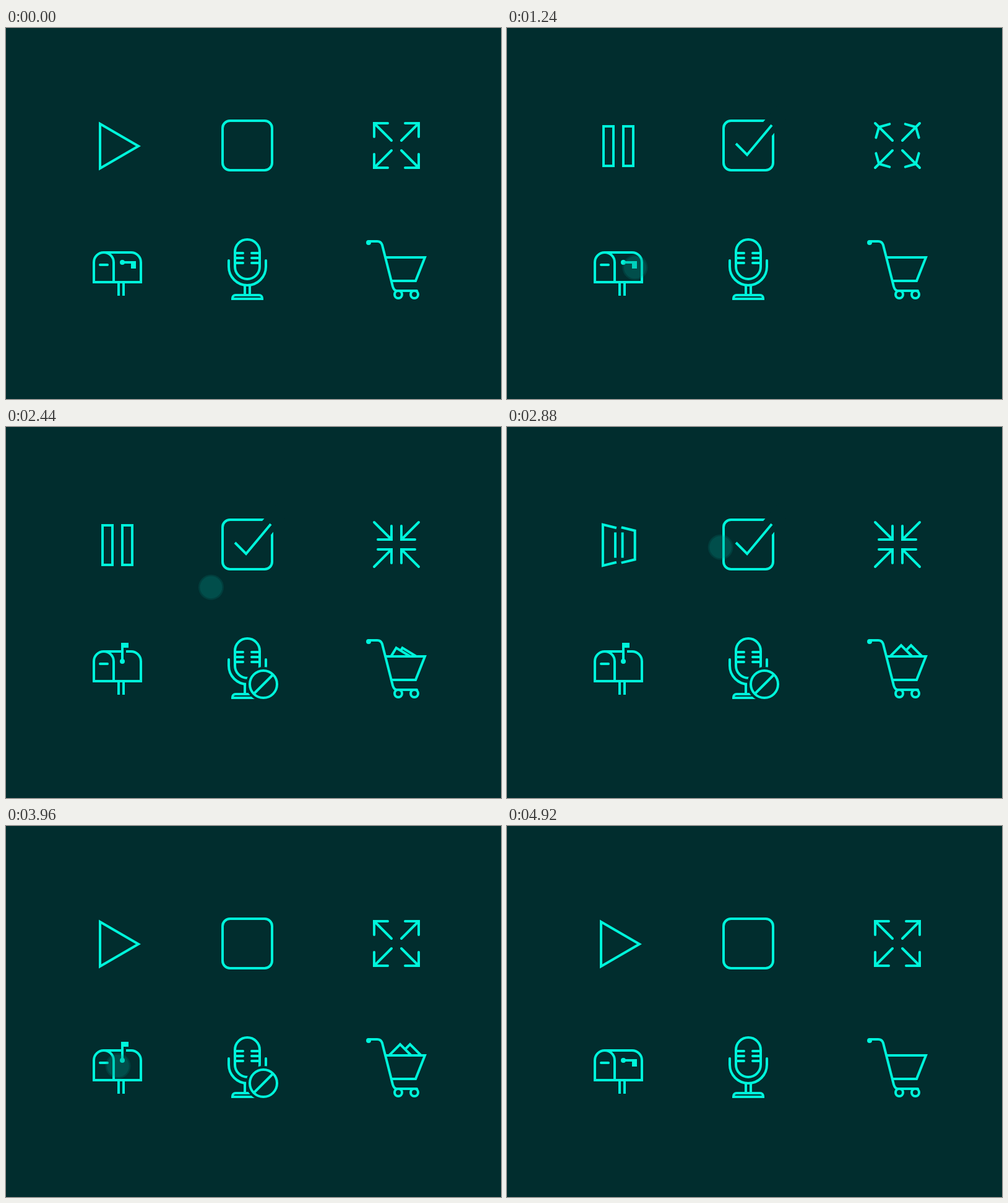
Animation, 800 px wide and 600 px high, one loop 5.2 s. Source, as an HTML page with a canvas:

```html
<!DOCTYPE html>
<html lang="en">
<head>
<meta charset="utf-8">
<title>Icon states</title>
<style>
html, body { margin: 0; width: 100%; height: 100%; overflow: hidden; background: #012d2e; }
canvas { display: block; }
</style>
</head>
<body>
<canvas id="stage" width="800" height="600"></canvas>
<script>
const ctx = document.getElementById('stage').getContext('2d');
const LOOP = 5200, STEP = 40;
const BG = '#012d2e', INK = '#00f5db';

const clamp = v => Math.max(0, Math.min(1, v));
const lerp = (a, b, p) => a + (b - a) * p;
const quad = u => u < 0.5 ? 2 * u * u : 1 - 2 * (1 - u) ** 2;
const quadOut = u => 1 - (1 - u) ** 2;
const cubic = u => u < 0.5 ? 4 * u ** 3 : 1 - 4 * (1 - u) ** 3;
const cubicIn = u => u ** 3;
const ramp = (t, from, to, ease = quad) => ease(clamp((t - from) / (to - from)));

function stroke(color = INK, width = 4, cap = 'butt') {
  ctx.strokeStyle = color;
  ctx.lineWidth = width;
  ctx.lineCap = cap;
  ctx.stroke();
}

function trace(points, closed) {
  ctx.beginPath();
  points.forEach(([x, y]) => ctx.lineTo(x, y));
  if (closed) ctx.closePath();
}

function line(points, cap = 'butt', color = INK, width = 4) {
  trace(points);
  stroke(color, width, cap);
}

function disc(x, y, r, color = INK) {
  ctx.beginPath();
  ctx.arc(x, y, r, 0, Math.PI * 2);
  ctx.fillStyle = color;
  ctx.fill();
}

function path(d, cap) {
  ctx.strokeStyle = INK;
  ctx.lineWidth = 4;
  ctx.lineCap = cap || 'butt';
  ctx.stroke(new Path2D(d));
}

// p: 0 = play triangle, 1 = pause bars
function drawPlay(p) {
  const mix = (a, b) => [lerp(a[0], b[0], p), lerp(a[1], b[1], p)];
  const left = [
    mix([183, 173], [172, 159]), mix([152, 155], [156, 159]),
    mix([152, 227], [156, 223]), mix([183, 209], [172, 223])
  ];
  const right = [
    mix([183, 173], [188, 159]), mix([214, 191], [204, 159]),
    mix([214, 191], [204, 223]), mix([183, 209], [188, 223])
  ];
  if (p === 0) {
    trace([[152, 155], [214, 191], [152, 227]], true);
    stroke();
    return;
  }
  for (const half of [left, right]) {
    line(half, 'square');
    const [x, top] = half[0], bottom = half[3][1];
    const mid = (top + bottom) / 2, reach = (bottom - top) / 2 * p;
    line([[x, mid - reach], [x, mid + reach]]);
  }
}

// The tick is visible between the fractions start and end of its length
function drawCheckbox(start, end, gap) {
  ctx.beginPath();
  ctx.roundRect(350, 150, 80, 80, 12);
  stroke();
  if (gap > 0) line([[412, 174], [448, 131]], 'butt', BG, 25 * gap);

  const a = [370, 187], b = [388, 205], c = [428, 157];
  const first = Math.hypot(18, 18), second = Math.hypot(40, 48);
  const total = first + second;
  const at = d => d < first
    ? [lerp(a[0], b[0], d / first), lerp(a[1], b[1], d / first)]
    : [lerp(b[0], c[0], (d - first) / second), lerp(b[1], c[1], (d - first) / second)];
  const from = start * total, to = end * total;
  if (to - from < 0.1) return;
  const points = [at(from)];
  if (from < first && to > first) points.push(b);
  points.push(at(to));
  line(points);
}

// p: 0 = arrows outwards, 1 = arrows inwards
function drawExpand(p) {
  for (const sx of [-1, 1]) for (const sy of [-1, 1]) {
    const at = (x, y) => [631 + sx * x, 190 + sy * y];
    const tip = lerp(36, 8, p), far = lerp(36, 30, p), near = lerp(14, 8, p);
    line([at(36, 36), at(8, 8)], 'round');
    line([at(far, near), at(tip, tip), at(near, far)], 'round');
  }
}

function drawMailbox(p) {
  path('M142 411V379A16 16 0 0 1 174 379V411M158 363H202A16 16 0 0 1 218 379V411M140 411H220');
  path('M182 411V433M190 411V433');
  path('M152 383H164', 'round');

  const length = lerp(22, 30, p);
  ctx.save();
  ctx.beginPath();
  ctx.rect(176, 359, 30, 8);
  ctx.clip();
  ctx.translate(188, 379);
  ctx.rotate(-Math.PI / 2 * p);
  ctx.fillStyle = BG;
  ctx.fillRect(0, 2, length, 4);
  ctx.restore();

  ctx.save();
  ctx.translate(188, 379);
  ctx.rotate(-Math.PI / 2 * p);
  ctx.fillStyle = INK;
  ctx.fillRect(0, -2, length, 4);
  ctx.fillRect(length - 8, -2, 8, 12);
  ctx.restore();
  disc(188, 379, 4);
}

function drawMic(p) {
  ctx.beginPath();
  ctx.roundRect(370, 342, 40, 64, 20);
  stroke();
  for (const y of [364, 372, 380]) path(`M371 ${y}H383M397 ${y}H409`, 'round');
  path('M360 376V386A30 30 0 0 0 420 386V376', 'round');
  path('M386 416V432M394 416V432');
  path('M366 438V437A5 5 0 0 1 371 432H409A5 5 0 0 1 414 437V438Z');
  if (p <= 0) return;

  ctx.save();
  ctx.translate(416, 416);
  ctx.scale(p, p);
  disc(0, 0, 28, BG);
  ctx.beginPath();
  ctx.arc(0, 0, 22, 0, Math.PI * 2);
  stroke();
  line([[-15, 15], [15, -15]]);
  ctx.restore();
}

function drawParcel(x, y, angle) {
  ctx.save();
  ctx.translate(x, y);
  ctx.rotate(angle);
  ctx.beginPath();
  ctx.rect(-19, -19, 38, 38);
  ctx.fillStyle = BG;
  ctx.fill();
  stroke();
  ctx.restore();
}

function drawCart(p) {
  if (p > 0) {
    ctx.save();
    ctx.beginPath();
    ctx.rect(612, 330, 66, 41);
    ctx.clip();
    const rest = 1 - p, angle = Math.PI / 4 * p;
    drawParcel(653 - 20 * rest, 380 + 11 * rest, angle);
    drawParcel(637, 380 + 11 * rest, angle);
    ctx.restore();
  }
  path('M586 345H600Q606 345 608 351L625 418Q627 425 632 425H664', 'round');
  path('M613 371H677L662 409H623');
  disc(586, 347, 4);
  for (const x of [634, 660]) {
    disc(x, 431, 8, INK);
    disc(x, 431, 4, BG);
  }
}

// Pointer stops: arrival, departure, x, y
const stops = [
  [-40, -40, -40, 268],
  [260, 300, 185, 190],
  [620, 690, 388, 193],
  [950, 960, 631, 180],
  [1330, 1480, 181, 400],
  [1800, 1880, 390, 385],
  [2160, 2200, 650, 390],
  [2620, 2680, 185, 199],
  [3000, 3060, 388, 193],
  [3340, 3440, 618, 178],
  [3960, 4020, 181, 388],
  [4320, 4380, 390, 385],
  [4640, 4700, 650, 390],
  [4920, 5200, 830, 346]
];

function drawPointer(t) {
  let i = stops.length - 1;
  while (t < stops[i][0]) i--;
  const here = stops[i], next = stops[i + 1] || here;
  const ease = i === stops.length - 2 ? cubicIn : cubic;
  const p = next === here ? 0 : ramp(t, here[1], next[0], ease);
  const x = lerp(here[2], next[2], p), y = lerp(here[3], next[3], p);
  disc(x, y, 20.5, 'rgba(0,140,130,0.18)');
  disc(x, y, 18, 'rgba(0,140,130,0.2)');
}

// Switches on during one interval and off again during another
const toggle = (t, on, onEnd, off, offEnd, ease) =>
  ramp(t, on, onEnd, ease) - ramp(t, off, offEnd);

function draw(t) {
  ctx.fillStyle = BG;
  ctx.fillRect(0, 0, 800, 600);
  drawPlay(toggle(t, 280, 640, 2740, 3120));
  drawCheckbox(ramp(t, 3120, 3520), ramp(t, 620, 1020), toggle(t, 860, 1020, 3460, 3640));
  drawExpand(toggle(t, 1080, 1560, 3460, 3960));
  drawMailbox(toggle(t, 1440, 1780, 4060, 4400));
  drawMic(toggle(t, 1900, 2320, 4400, 4720, quadOut));
  drawCart(toggle(t, 2260, 2660, 4680, 4900, quadOut));
  drawPointer(t);
}

const begin = performance.now();
function tick() {
  const t = (performance.now() - begin) % LOOP;
  draw(Math.floor(t / STEP) * STEP);
  requestAnimationFrame(tick);
}
tick();
</script>
</body>
</html>
```
